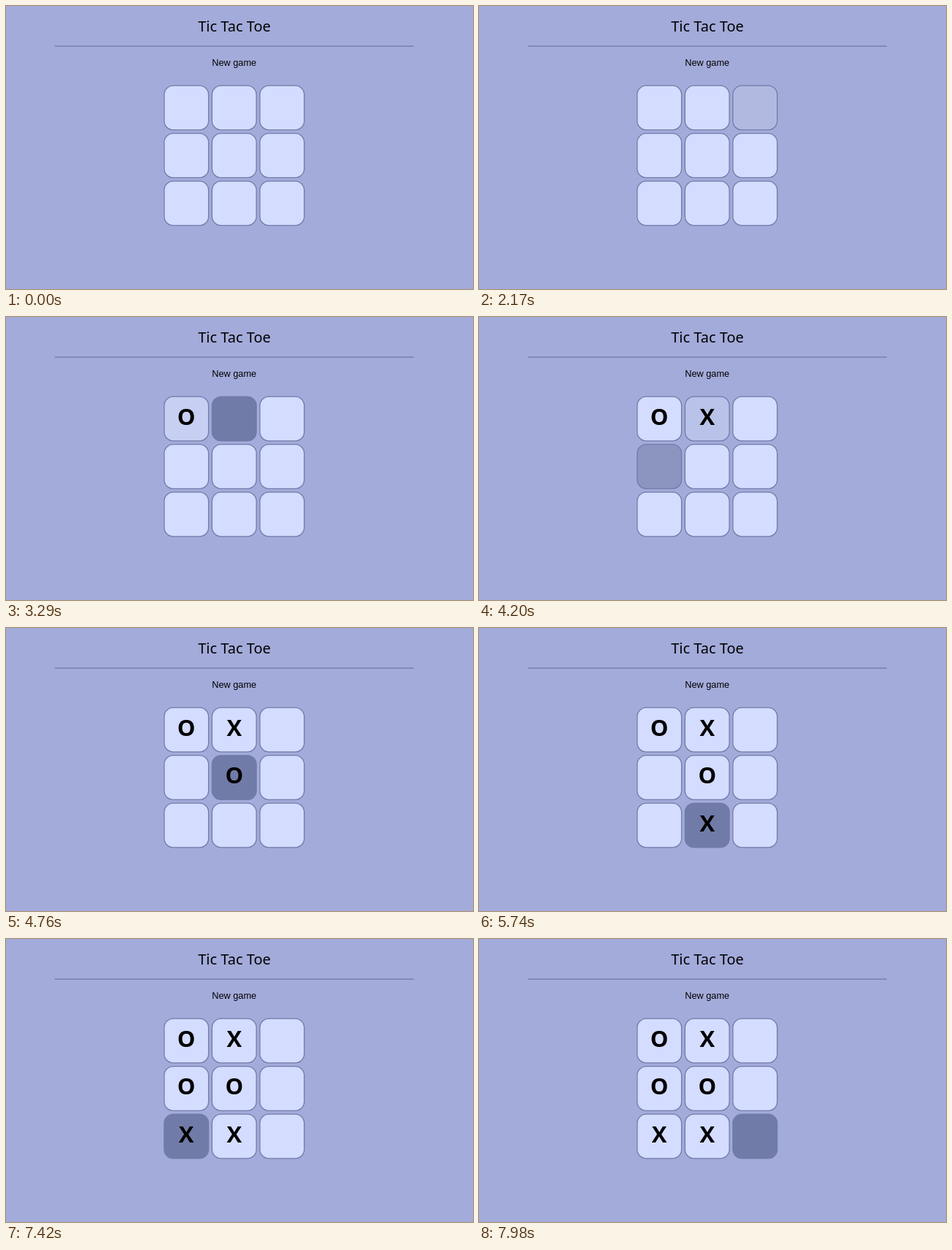
Write an HTML page that moves like this. It is 640 px wide and 388 px high and loops after 8 s.

```html
<!DOCTYPE html>
<html lang="en">
<head>
<meta charset="utf-8">
<title>Tic Tac Toe</title>
<style>
  html, body { margin: 0; width: 100%; height: 100%; overflow: hidden; background: #a3abda; }
  svg { display: block; width: 100%; height: 100%; }
  text { text-anchor: middle; fill: #000; }
  .title { font: 20px "Noto Sans", "Open Sans", sans-serif; }
  .status { font: 12.75px "Liberation Sans", Arial, sans-serif; }
  .mark { font: 600 31px "Noto Sans", "Open Sans", sans-serif; }
  .cell { stroke: #717ba8; stroke-width: 1.3; }
</style>
</head>
<body>
<svg viewBox="0 0 640 388">
  <rect width="640" height="388" fill="#a3abda"/>
  <text class="title" x="313" y="34.5">Tic Tac Toe</text>
  <rect x="67" y="54.4" width="492" height="1.3" fill="#717ba8"/>
  <text class="status" x="312.7" y="81.5">New game</text>
  <g id="board"></g>
</svg>
<script>
const LOOP = 8000, FADE = 300;
const BASE = [212, 220, 255], HOVER = [113, 123, 168];

// Pointer visits: [cell, enter, leave] in ms
const visits = [
  [2, 2103, 2240], [1, 2240, 2430], [0, 2430, 3119],
  [1, 3010, 4070], [3, 4070, 4215], [4, 4215, 5285],
  [7, 5285, 6115], [4, 6115, 6210], [3, 6210, 6970],
  [4, 6950, 7090], [6, 7090, 7590], [7, 7590, 7675], [8, 7675, LOOP]
];
// Moves: [cell, mark, time]
const moves = [
  [0, "O", 2870], [1, "X", 3500], [4, "O", 4760],
  [7, "X", 5670], [3, "O", 6650], [6, "X", 7420]
];

const board = document.getElementById("board");

function add(tag, attrs) {
  const node = document.createElementNS("http://www.w3.org/2000/svg", tag);
  for (const name in attrs) node.setAttribute(name, attrs[name]);
  return board.appendChild(node);
}

const cells = Array.from({ length: 9 }, (_, i) => {
  const x = 247.2 + (i % 3) * 65.55;
  const y = 139.5 + Math.floor(i / 3) * 65.5;
  const rect = add("rect", { class: "cell", x: x - 30.4, y: y - 30.4, width: 60.8, height: 60.8, rx: 12.5 });
  const label = add("text", { class: "mark", x, y: y + 8 });
  const toggles = visits.filter(v => v[0] === i)
    .flatMap(([, enter, leave]) => [[enter, 1], [leave, 0]]);
  return { rect, label, toggles, move: moves.find(m => m[0] === i) };
});

// CSS "ease": cubic-bezier(.25, .1, .25, 1)
function ease(p) {
  if (p <= 0) return 0;
  if (p >= 1) return 1;
  const bezier = (a, b, s) => 3 * a * s * (1 - s) ** 2 + 3 * b * s * s * (1 - s) + s ** 3;
  let lo = 0, hi = 1;
  for (let i = 0; i < 24; i++) {
    const mid = (lo + hi) / 2;
    if (bezier(0.25, 0.25, mid) < p) lo = mid; else hi = mid;
  }
  return bezier(0.1, 1, lo);
}

// Interrupted fades reverse in proportionally less time
function hoverLevel(toggles, time) {
  let start = 0, from = 0, to = 0;
  const at = t => from === to ? to
    : from + (to - from) * ease((t - start) / (FADE * Math.abs(to - from)));
  for (const [when, target] of toggles) {
    if (when > time) break;
    from = at(when);
    start = when;
    to = target;
  }
  return at(time);
}

function draw(time) {
  for (const { rect, label, toggles, move } of cells) {
    const level = hoverLevel(toggles, time);
    const rgb = BASE.map((c, i) => Math.round(c + (HOVER[i] - c) * level));
    rect.setAttribute("fill", `rgb(${rgb})`);
    label.textContent = move && time >= move[2] ? move[1] : "";
  }
}

const origin = performance.now();
function tick() {
  draw((performance.now() - origin) % LOOP);
  requestAnimationFrame(tick);
}
tick();
</script>
</body>
</html>
```
